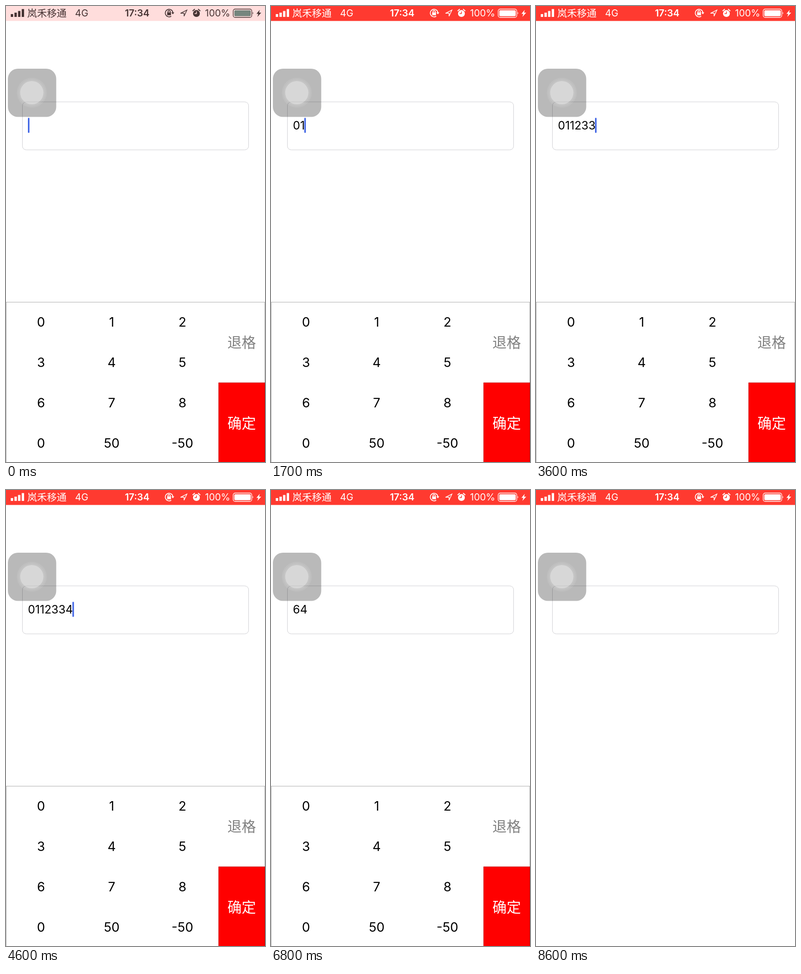
These frames come from a looping animation (544x960 px, 8.8 s). An HTML page:

```html
<!DOCTYPE html>
<html lang="zh">
<head>
<meta charset="utf-8">
<style>
html, body { margin: 0; height: 100%; overflow: hidden; background: #fff; }
svg { display: block; width: 544px; height: 960px; font-family: Inter, "Noto Sans CJK SC", "Noto Sans CJK", sans-serif; }
.mid { text-anchor: middle; }
#keys { font-size: 27px; }
.side { font-size: 30px; }
</style>
</head>
<body>
<svg viewBox="0 0 544 960">
  <rect id="bar" width="544" height="31.500" fill="#ff3a30"/>
  <g id="status" fill="currentColor" font-size="20">
    <path d="M10 17h5v6h-5zM17.700 14h5v9h-5zM25.300 10.500h5v12.500h-5zM33 6.500h5v16.500h-5z"/>
    <text x="44.500" y="22.500" font-size="20.700" font-weight="300">岚禾移通</text>
    <text x="145" y="22">4G</text>
    <text x="275.500" y="22" class="mid" font-weight="600">17:34</text>
    <g fill="none" stroke="currentColor" stroke-width="1.700">
      <path d="M347 21.500A8 8 0 1 1 350.500 14"/>
      <path d="M340.300 14v-2a2.300 2.300 0 0 1 4.600 0v2"/>
      <path d="M366.500 15.300L380 8.500L374 21.500V15.300Z" stroke-width="1.400"/>
      <rect x="477.200" y="6.500" width="39" height="17.500" rx="4" stroke-width="1.300"/>
    </g>
    <path d="M338.500 13.500h8v6h-8zM347.300 13.500h6.200l-3.100 4z"/>
    <path d="M518 12.500q2.500 2.500 0 5zM533 8l-7 8.500h4l-2 6.500l8-9h-4.500z"/>
    <circle cx="400" cy="15.800" r="7.200"/>
    <path d="M392.500 10l3.500-3M407.500 10l-3.500-3" stroke="currentColor" stroke-width="2" stroke-linecap="round"/>
    <path id="hands" d="M400 11.500V16H396" fill="none" stroke-width="1.500"/>
    <text x="418" y="22">100%</text>
    <rect id="charge" x="479.500" y="9" width="34.500" height="12.500" rx="2"/>
  </g>

  <rect x="34.500" y="201.900" width="475" height="101" rx="8" fill="none" stroke="#d0d0d4"/>
  <text id="entry" x="46" y="260" font-size="24"></text>
  <rect id="caret" y="235.500" width="3.300" height="31.500" rx="1.200" fill="#4468e6"/>

  <rect x="4" y="132" width="101.500" height="101.500" rx="21" fill="#000" opacity=".275"/>
  <g fill="#fff" transform="translate(54.200 182.500)">
    <circle r="31.500" opacity=".08"/><circle r="28" opacity=".08"/><circle r="24.500" opacity=".32"/>
  </g>

  <g id="pad">
    <rect x=".5" y="623.500" width="543" height="340" fill="#fff" stroke="#adadad"/>
    <rect id="pressed" x="446.500" y="624" width="97" height="168" fill="#dcdadc"/>
    <rect x="446.800" y="793.200" width="96.700" height="170" fill="#f00" stroke="#c40000"/>
    <g id="keys" class="mid"></g>
    <text class="mid side" x="495" y="718.500" fill="#808080" font-weight="300">退格</text>
    <text class="mid side" x="495" y="888.500" fill="#fff" font-weight="300">确定</text>
  </g>
</svg>
<script>
const LOOP = 8800, STEP = 100;
const $ = id => document.getElementById(id);
const within = (t, ...spans) => spans.some(([from, to]) => t >= from && t < to);
const ramp = (t, from, to) => Math.min(1, Math.max(0, (t - from) / (to - from)));
const mix = (a, b, k) => a + (b - a) * k;
const blend = (from, to, k) => `rgb(${from.map((c, i) => mix(c, to[i], k))})`;
const WHITE = [255, 255, 255];

$("keys").innerHTML = [0, 1, 2, 3, 4, 5, 6, 7, 8, 0, 50, -50].map((key, i) =>
  `<text x="${73.5 + i % 3 * 148.5}" y="${674.5 + Math.floor(i / 3) * 85}">${key}</text>`).join("");

// Taps on the keypad: time and key; "<" deletes one digit, "C" clears after a long press.
const taps = [
  [900, "0"], [1300, "1"], [2200, "1"], [2600, "2"], [3000, "3"], [3400, "3"],
  [3900, "4"], [4200, "5"], [4600, "<"], [5200, "C"],
  [5800, "6"], [6400, "4"], [7800, "C"]
];

function entryAt(t) {
  return taps.filter(([at]) => at <= t).reduce((text, [, key]) =>
    key === "C" ? "" : key === "<" ? text.slice(0, -1) : text + key, "");
}

function draw(t) {
  const red = ramp(t, 0, 600);
  $("bar").style.opacity = mix(0.17, 1, red);
  $("status").style.color = blend([70, 52, 52], WHITE, red);
  $("charge").style.fill = blend([118, 134, 126], WHITE, red);
  $("hands").style.stroke = blend([255, 217, 215], [255, 58, 48], red);

  const text = entryAt(t);
  $("entry").textContent = text;
  $("caret").setAttribute("x", 46 + (text ? $("entry").getComputedTextLength() - 1 : 0));
  $("caret").style.opacity = within(t, [6800, 7100], [8500, LOOP]) ? 0 : 1;

  $("pressed").style.opacity = within(t, [4400, 4600], [4700, 5400], [7300, 8000]) ? 1 : 0;
  $("pad").setAttribute("transform", `translate(0 ${340 * ramp(t, 8400, 8600)})`);
}

function tick(now) {
  draw(Math.floor(now % LOOP / STEP) * STEP);
  requestAnimationFrame(tick);
}
tick(performance.now());
</script>
</body>
</html>
```
